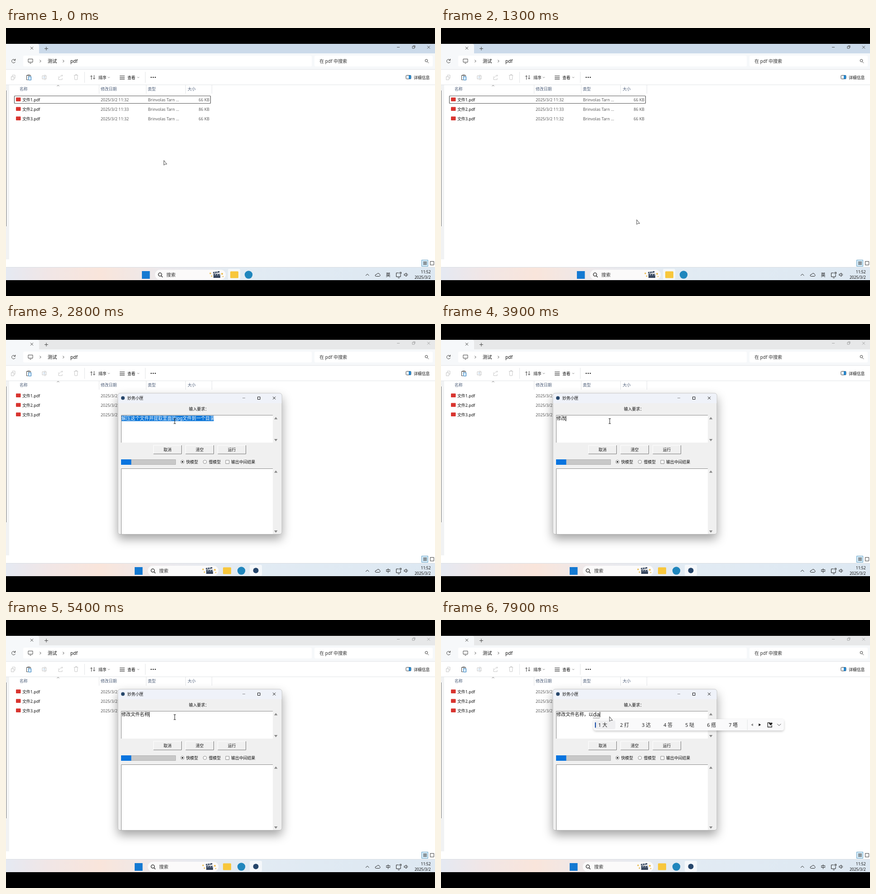
Animation of 947x592 px, one loop 8000 ms. Source, as an HTML page:

```html
<!DOCTYPE html>
<html lang="zh-CN">
<head>
<meta charset="utf-8">
<style>
html, body { margin: 0; width: 100%; height: 100%; overflow: hidden; background: #000; }
svg { display: block; width: 947px; height: 592px; }
text { font: 8.9px "Noto Sans", "Noto Sans CJK SC", "Noto Sans CJK", sans-serif; fill: #333; white-space: pre; }
.dark text { fill: #111; }
.head text { fill: #4c5d78; }
.dim { opacity: .3; }
.line { fill: none; stroke: #444; }
.edge { fill: none; stroke: #e2e4e6; }
.big { font-size: 10.2px; }
.mid { text-anchor: middle; }
.end { text-anchor: end; }
#typed, #old { font-size: 10.1px; font-family: "Liberation Sans", "Noto Sans CJK SC", "Noto Sans CJK", sans-serif; }
#comp { font-size: 12.3px; }
#list text { font-size: 10.8px; fill: #222; }
</style>
</head>
<body>
<svg viewBox="0 0 947 592">
  <defs>
    <linearGradient id="bar">
      <stop offset="0" stop-color="#e5e9f2"/><stop offset=".1" stop-color="#f1e6e6"/>
      <stop offset=".22" stop-color="#f9e5db"/><stop offset=".36" stop-color="#ece9ec"/>
      <stop offset=".55" stop-color="#e2ebf3"/><stop offset="1" stop-color="#dde8f2"/>
    </linearGradient>
    <filter id="shadow" x="-20%" y="-20%" width="140%" height="150%">
      <feDropShadow dx="0" dy="10" stdDeviation="11" flood-opacity=".36"/>
    </filter>
    <filter id="soft" x="-5%" y="-30%" width="110%" height="190%">
      <feDropShadow dx="0" dy="2" stdDeviation="2.5" flood-opacity=".22"/>
    </filter>
    <path id="down" d="M-2.2-1L0 1.2 2.2-1" class="line"/>
  </defs>

  <!-- file window -->
  <path fill="#fff" d="M0 35h947v493H0z"/>
  <path id="tabs" d="M0 35h947v21H0z"/>
  <path fill="#f6f8fa" d="M0 35h69q4 0 4 4v17h874v35H0z"/>
  <g fill="#fff"><rect x="38" y="61" width="637" height="24" rx="3"/><rect x="681" y="61" width="261" height="24" rx="3"/></g>
  <path class="edge" d="M0 91.5h947M0 125.5h947"/>
  <path class="line" d="M54 41.500l6 6m0-6l-6 6M85 45.500h8m-4-4v8"/>
  <path class="line" id="controls" d="M863 42.500h6M897 40.500h4.500v4.500h-4.500zM898.500 39h4.500v4.500M930 39.500l6 6m0-6l-6 6"/>
  <path class="line" d="M20 71a4 4 0 1 0 .4 3.500M20.500 68v3.500h-3.500M49 68.500h10v7h-10zM52 78h4M74.500 70.500l2.500 2.700-2.500 2.700M125.500 70.500l2.500 2.700-2.500 2.700"/>
  <g class="dark"><text class="big" x="92" y="77">测试</text><text class="big" x="142" y="77">pdf</text></g>
  <text x="692" y="77" style="font-size:10px">在 pdf 中搜索</text>
  <path class="line" d="M930 74.500l3 3"/><circle class="line" cx="928" cy="72" r="2.800"/>

  <g class="line dim" stroke="#456">
    <path d="M11.500 107.500h6v7h-6zM14 107v-3h6v7h-2.500M80 105.500h9v7h-9zM86 102.500v13M116 107v7h8v-3M118 110q1-5 7-5l-2-2m2 2l-2 2M150 104.500h9M151 105l.8 9h5.500l.8-9M153.500 104v-1.500h3v1.500"/>
    <path d="M82 111l2-4 2 4" stroke="#27c"/>
  </g>
  <path class="line" d="M48 104.500h-2.500v10h3M52 104.500h2.500v2M48 103.500h4v2h-4z" stroke="#567"/>
  <path d="M49.500 107.500h6v7.500h-6z" fill="#d9ecfb" stroke="#2878b8"/>
  <path class="edge" d="M173.500 97v24M307.500 97v24"/>
  <path class="line" d="M188.500 114v-9l-2.300 2.500m2.300-2.500l2.300 2.500"/>
  <path class="line" d="M194.500 104v9l-2.300-2.500m2.300 2.500l2.300-2.500" stroke="#2878c8"/>
  <path class="line" d="M251 105.500h11M251 108.500h11M251 111h11M251 113.500h11" stroke="#666"/>
  <use href="#down" x="227" y="109" opacity=".6"/><use href="#down" x="292" y="109" opacity=".6"/>
  <g fill="#222"><circle cx="320.500" cy="109" r="1.300"/><circle cx="325" cy="109" r="1.300"/><circle cx="329.500" cy="109" r="1.300"/></g>
  <rect class="line" x="883" y="104.500" width="11" height="8" rx="1.500"/><path fill="#2688d0" d="M889 104.500h5v8h-5z"/>
  <g class="dark"><text x="204" y="112.500">排序</text><text x="268" y="112.500">查看</text><text x="900" y="112.500">详细信息</text></g>

  <path fill="#f1f2f3" d="M0 126h7v385H0z"/><path fill="#777" d="M0 138h1v300H0z"/>
  <path class="edge" d="M205.500 126v19M309.500 126v19M396.500 126v19M454.500 126v19"/>
  <path class="line" d="M112.500 128.500l2.500-2 2.500 2" stroke="#999" opacity=".7"/>
  <g class="head"><text x="30" y="138">名称</text><text x="209" y="138">修改日期</text><text x="313" y="138">类型</text><text x="401" y="138">大小</text></g>
  <g id="files"></g>
  <rect id="focus" x="18.500" y="150" width="433" height="16.500" rx="1" fill="none" stroke="#555" stroke-width="1.200"/>
  <path d="M917.500 512.500h14v14h-14z" fill="#d5ebf8" stroke="#6aa5c8"/>
  <path class="line" d="M921 516.500h8M921 518.500h8M921 520.500h8M921 522.500h8M936.500 515.500h8v8h-8z"/>

  <!-- taskbar -->
  <path fill="url(#bar)" d="M0 528h947v29H0z"/><path stroke="#d9dde2" d="M0 528.500h947"/>
  <g id="apps">
    <rect x="300" y="537" width="17.500" height="17" fill="#1479d2"/>
    <rect x="329" y="534" width="156" height="22" rx="11" fill="#fbfafa"/>
    <circle cx="340" cy="544.500" r="3.700" fill="none" stroke="#222" stroke-width="1.300"/><path stroke="#222" stroke-width="1.300" d="M342.800 547.500l3 3"/>
    <text class="big" x="354" y="549">搜索</text>
    <path fill="#39485f" d="M458 543h15v9h-15zM457 539l14-2 .6 3-14 2.500z"/>
    <path stroke="#d7e1ec" stroke-width="1.500" d="M460 541l2-2.500M465 540l2-2.500M461 546l2-2M466 546l2-2M471 546l1.500-2"/>
    <g fill="#e9b949"><circle cx="451" cy="542" r="1.700"/><circle cx="454" cy="548" r="1.500"/><circle cx="477" cy="543" r="2"/><circle cx="479" cy="549" r="1.200"/></g>
    <rect id="folderBack" x="490" y="532" width="27" height="24" rx="3" fill="#fff" opacity=".6"/>
    <rect x="495" y="537.500" width="18" height="15" rx="1.500" fill="#f8c73c"/>
    <circle cx="535.500" cy="545" r="8.700" fill="#1f86bd"/>
  </g>
  <g id="toolApp"><rect x="538" y="532" width="27" height="24" rx="3" fill="#fff" opacity=".65"/><circle cx="551.500" cy="544.500" r="6" fill="#26466b"/></g>
  <path class="line" d="M794 547l3.700-3.500 3.700 3.500M817.500 548.500h7a2.500 2.500 0 0 0 0-4.500q-1-3-4-2-1.500.6-2 2-3.500.5-3.500 2.500 0 2 2.500 2zM871 544v5.500h-9.500v-8.500h6M865 552h4M869.500 539.500h3v3h-3zM879 543.500h2l2.500-2.500v8l-2.500-2.500h-2zM885.500 542.500q2 2.300 0 5" style="stroke:#222"/>
  <g class="dark"><text class="mid big" id="mode" x="843.500" y="549"></text><text class="end" x="937.500" y="542" style="font-size:8.500px">11:52</text><text class="end" x="937.500" y="554" style="font-size:8.500px">2025/3/2</text></g>

  <!-- tool dialog -->
  <g id="dialog" class="dark">
    <rect x="247" y="153" width="362" height="311.500" rx="5" fill="#f0f0f0" stroke="#aaa" stroke-width=".8" filter="url(#shadow)"/>
    <path fill="#eff2f9" d="M247.500 175v-17q0-4.500 4.500-4.500h352q4.500 0 4.500 4.500v17z"/>
    <circle cx="258" cy="163.500" r="4" fill="#26466b"/>
    <text x="268" y="167">妙务小匣</text>
    <path class="line" d="M522 163.500h6" stroke="#888" opacity=".6"/><path class="line" d="M555.500 161h5.500v5.500h-5.500zM589 160.500l6 6m0-6l-6 6" style="stroke:#111"/>
    <text class="mid" x="426" y="190.500">输入要求：</text>
    <path fill="#fff" d="M254 202h335v60H254zM254 320h335v144H254z"/>
    <path class="line" d="M254.500 262v-60.500H589M254.500 464V319.500H589" style="stroke:#8b8b8b"/>
    <path fill="#888" d="M592 210.500l3.700-5 3.700 5zM592 254l3.700 5 3.700-5zM592 328.500l3.700-5 3.700 5zM592 456l3.700 5 3.700-5z"/>
    <g id="buttons"></g>
    <path fill="#c8c8c8" stroke="#b4b4b4" d="M254.500 299.500h120v11h-120z"/><path fill="#0874df" d="M254 299h22.500v12H254z"/>
    <g fill="#fff" stroke="#888"><circle cx="389.500" cy="304.500" r="3.800"/><circle cx="439" cy="304.500" r="3.800"/><path d="M485 301h7.500v7.500H485z"/></g>
    <circle cx="389.500" cy="304.500" r="1.700" fill="#111"/>
    <text x="397.500" y="308">快模型</text><text x="447.500" y="308">慢模型</text><text x="497" y="308">输出中间结果</text>
    <path id="selection" fill="#0874d8" d="M255 202.500h203.500v12H255z"/>
    <text id="old" x="255" y="212">解压这个文件并提取里面的jpg文件到一个目录</text>
    <text id="typed" x="255" y="212"></text>
    <text id="comp" y="213"></text>
    <path id="under" stroke="#333" stroke-dasharray="1.500 1"/>
    <path id="caret" stroke="#111" stroke-width="1.200"/>
  </g>

  <!-- candidate list -->
  <g id="list">
    <rect x="0" y="219" width="420" height="25" rx="5" fill="#fafafb" filter="url(#soft)"/>
    <rect x="2" y="222" width="46" height="19" rx="3" fill="#efeff1"/><rect x="3" y="226" width="2.200" height="12" rx="1" fill="#1c4fa8"/>
    <g id="words"></g>
    <path class="edge" d="M339.500 220v23"/>
    <path fill="#888" d="M352 228.500v6l-4.500-3z"/><path fill="#111" d="M364.500 228.500v6l5-3z"/>
    <path d="M389 227h-4.500v9.500h9v-4" fill="none" stroke="#222" stroke-width="1.300"/>
    <path fill="#222" d="M391 233l-3.500-3.500q-.5-3 2-3l1.500 1 1.500-1q3 0 2 3z"/>
    <path class="line" d="M405.500 229.500l4 4 4-4"/>
  </g>
  <path id="arrow" d="M0 0v10.500l2.600-2.300h4z" fill="#fff" stroke="#444"/>
  <path id="beam" class="line" style="stroke:#222" d="M-2.500-5.500h5M0-5.500v11M-2.500 5.500h5"/>
  <path d="M0 0h947v35H0zM0 557h947v35H0z"/>
</svg>
<script>
const el = id => document.getElementById(id);
const set = (id, attrs) => { for (const k in attrs) el(id).setAttribute(k, attrs[k]); };
const show = (id, on) => { el(id).style.display = on ? '' : 'none'; };

el('files').innerHTML = [[32, 66], [33, 86], [32, 66]].map(([minute, size], i) => {
  const y = 161.5 + 21 * i;
  return `<rect x="22" y="${y - 8}" width="10.500" height="8.500" rx="1" fill="#d8342f"/>
    <g class="dark"><text x="36" y="${y}">文件${i + 1}.pdf</text></g><g opacity=".8"><text x="209" y="${y}">2025/3/2 11:${minute}</text>
    <text x="313.500" y="${y}">Brinvolas Tarn ...</text><text class="end" x="449" y="${y}">${size} KB</text></g>`;
}).join('');

el('buttons').innerHTML = ['取消', '清空', '运行'].map((label, i) => {
  const x = 325.5 + 71 * i;
  return `<path fill="#f0f0f0" d="M${x} 268h62v19h-62z"/><path class="line" style="stroke:#fff" d="M${x} 287v-19h62"/>
    <path class="line" style="stroke:#777" d="M${x} 287h62v-19"/><text class="mid" x="${x + 31}" y="281">${label}</text>`;
}).join('');

const OPEN = 2100, SELECT = 2700, CLEAR = 3000;
// start time, committed text, pinyin being composed, candidates
const steps = [
  [CLEAR, ''],
  [3200, '', 'x', '小 下 想 写 需 像 新'],
  [3350, '', 'xiu', '修 秀 休 袖 绣 羞 宿'],
  [3550, '', 'xiu\'gai', '修改 修盖 修 秀 休 袖 绣'],
  [3850, '修改'],
  [4200, '修改', 'w', '我 为 无 位 问 外 完'],
  [4350, '修改', 'wen', '问 文 温 稳 闻 纹 吻'],
  [4550, '修改', 'wen\'jian', '文件 稳健 问 文 温 稳 闻'],
  [4750, '修改文件'],
  [4900, '修改文件', 'ming', '名 明 命 鸣 铭 冥 茗'],
  [5100, '修改文件', 'ming\'cheng', '名称 明成 名 明 命 鸣 铭'],
  [5300, '修改文件名称'],
  [5750, '修改文件名称，'],
  [6000, '修改文件名称，', 'yi', '一 以 已 意 亿 易 衣'],
  [6250, '修改文件名称，以'],
  [6450, '修改文件名称，以', 'z', '在 这 做 中 子 再 走'],
  [6550, '修改文件名称，以', 'zi', '子 自 字 紫 仔 兹 资'],
  [7350, '修改文件名称，以', 'z', '在 这 做 中 子 再 走'],
  [7450, '修改文件名称，以'],
  [7650, '修改文件名称，以', 'd', '的 大 到 都 对 多 点'],
  [7750, '修改文件名称，以', 'da', '大 打 达 答 哒 搭 嗒'],
];

const ease = (t, from, to) => {
  const p = Math.min(1, Math.max(0, (t - from) / (to - from)));
  return p * p * (3 - 2 * p);
};

function draw(t) {
  const open = t >= OPEN, grow = ease(t, OPEN, OPEN + 200);
  set('tabs', { fill: open ? '#e7e8e9' : '#cbdaea' });
  set('controls', { opacity: open ? .4 : .9 });
  show('focus', !open);
  show('folderBack', !open);
  el('mode').textContent = open ? '中' : '英';
  set('apps', { transform: `translate(${-16 * grow})` });
  set('toolApp', { opacity: grow });
  show('dialog', open);
  const scale = .9 + .1 * grow;
  set('dialog', { opacity: grow, transform: `translate(428 309) scale(${scale}) translate(-428 -309)` });

  show('old', t < CLEAR);
  show('selection', t >= SELECT && t < CLEAR);
  el('old').style.fill = t >= SELECT ? '#fff' : '#111';

  const [, typed = '', comp = '', words = ''] = steps.findLast(s => s[0] <= t) || [];
  const x = 255 + 10.1 * typed.length;
  el('typed').textContent = typed;
  el('comp').textContent = comp;
  set('comp', { x });
  const end = x + (comp ? el('comp').getComputedTextLength() : 0);
  set('under', { d: comp ? `M${x} 216.500H${end}` : '' });
  set('caret', { d: `M${end + .5} 203v11.500` });
  show('caret', t >= CLEAR && (t + 100) % 1000 < 600);

  show('list', comp);
  set('list', { transform: `translate(${x + 1})` });
  el('words').innerHTML = words && words.split(' ').map((w, i) =>
    `<text x="${10.5 + 48 * i}" y="236">${i + 1} ${w}</text>`).join('');

  const drift = ease(t, 100, 1200), aim = ease(t, 2100, 2600);
  const cx = 348.5 + 83.5 * drift - 60 * aim, cy = 292.5 + 131 * drift - 210 * aim;
  const beam = aim === 1 && !comp;
  show('beam', beam);
  show('arrow', !beam);
  set('beam', { transform: 'translate(372.500 214.500)' });
  set('arrow', { transform: `translate(${cx} ${cy})` });
}

(function tick() {
  draw(performance.now() % 8000);
  requestAnimationFrame(tick);
})();
</script>
</body>
</html>
```
